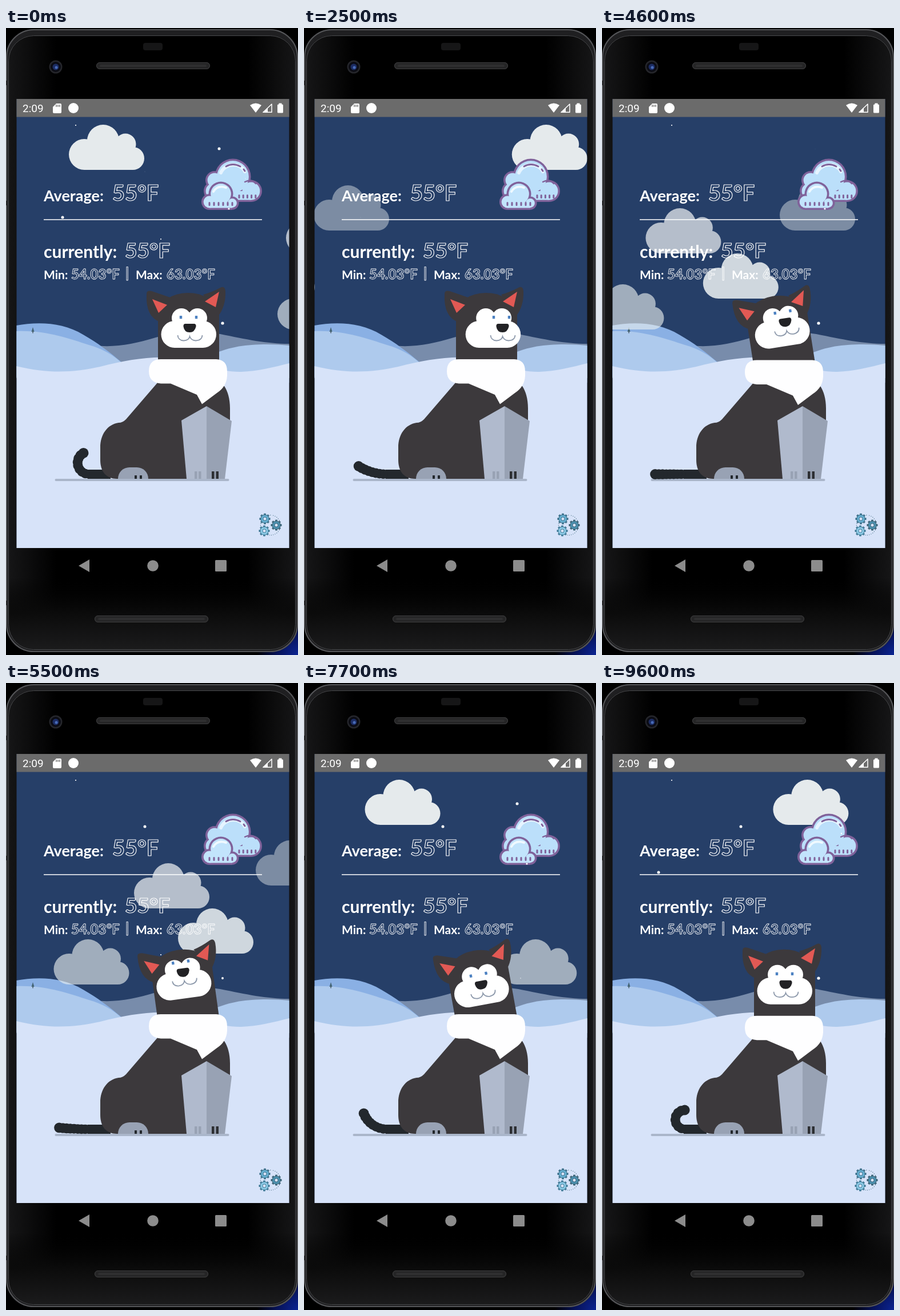
Animation, 511 px wide and 1096 px high, one loop 9.7 s. Source, as an HTML page with a canvas:

```html
<!DOCTYPE html>
<html lang="en">
<head>
<meta charset="utf-8">
<title>Winter weather</title>
<style>
html, body { margin: 0; width: 100%; height: 100%; overflow: hidden; background: #000; }
canvas { display: block; width: 100vw; height: 100vh; }
</style>
</head>
<body>
<canvas id="stage" width="511" height="1096"></canvas>
<script>
const c = document.getElementById('stage').getContext('2d');
const LOOP = 9.7, STEP = 0.1;

const clamp = u => Math.max(0, Math.min(1, u));
const wave = turns => Math.cos(turns * Math.PI * 2);

// Eased 0 to 1 between two times
function ramp(from, to, t) {
  const u = clamp((t - from) / (to - from));
  return u * u * (3 - 2 * u);
}

// Rises over one span of time and falls over another
const swell = (a, b, d, e, t) => ramp(a, b, t) * (1 - ramp(d, e, t));

function shape(d, color) {
  c.fillStyle = color;
  c.fill(new Path2D(d));
}

function line(d, color, width) {
  c.strokeStyle = color;
  c.lineWidth = width;
  c.stroke(new Path2D(d));
}

function box(x, y, w, h, r, color) {
  c.fillStyle = color;
  c.beginPath();
  c.roundRect(x, y, w, h, r);
  c.fill();
}

function frameBox(x, y, w, h, r, color, width) {
  c.strokeStyle = color;
  c.lineWidth = width;
  c.beginPath();
  c.roundRect(x, y, w, h, r);
  c.stroke();
}

function dot(x, y, r, color) {
  c.fillStyle = color;
  c.beginPath();
  c.arc(x, y, r, 0, 7);
  c.fill();
}

function shade(gradient, ...colors) {
  colors.forEach((color, i) => gradient.addColorStop(i / (colors.length - 1), color));
  return gradient;
}

// Phone

function phone() {
  box(0, 0, 511, 1096, 0, '#000');
  const glow = c.createRadialGradient(511, 1096, 2, 511, 1096, 72);
  box(430, 1030, 81, 66, 0, shade(glow, '#0b2390', '#061258', '#000'));

  box(0, 2, 511, 1089, 48, '#1f1f21');
  frameBox(1, 3, 509, 1087, 48, '#555659', 2);
  box(4, 13, 503, 1074, 44, shade(c.createLinearGradient(4, 0, 507, 0), '#161617', '#000', '#000', '#000', '#000', '#000', '#161617'));
  box(5, 960, 501, 126, [0, 0, 44, 44], shade(c.createLinearGradient(0, 960, 0, 1086), '#0000', '#0b0b0b', '#1b1b1c'));
  frameBox(4.5, 13.5, 502, 1073, 44, '#48494c', 1);
  for (const y of [92, 302, 1001]) box(0, y, 4, 8, 0, '#2b2b2d');

  box(240, 26, 34, 13, 4, '#161617');
  for (const [x, y] of [[158, 60], [155, 1027]]) {
    box(x, y, 199, 12, 6, '#252526');
    frameBox(x + 0.5, y + 0.5, 198, 11, 5.5, '#3f3f40', 1);
    box(x + 6, y + 4, 187, 4, 2, '#2f2f30');
  }
  dot(87, 68, 11.5, '#25262b');
  dot(87, 68, 9, '#0b0c14');
  dot(87, 68, 5.5, '#1c2c62');
  dot(88, 69, 2.5, '#486bb8');

  shape('M127 940 L146 929 V951 Z', '#8c8c8c');
  dot(257, 940, 9.8, '#8c8c8c');
  box(366, 930, 20, 20, 1.5, '#8c8c8c');
}

function statusBar() {
  box(18, 124, 478, 31.5, 0, '#6b6b6b');
  c.fillStyle = '#fff';
  c.font = '19px Roboto, sans-serif';
  c.fillText('2:09', 29, 147);
  shape('M88 132 H95 Q97 132 97 134 V147 Q97 149 95 149 H84 Q82 149 82 147 V138 Z', '#fff');
  for (const x of [88, 91, 94]) box(x - 0.7, 134, 1.4, 4, 0, '#6b6b6b');
  dot(118, 140, 9, '#fff');
  shape('M427 135 Q437 128 447 135 L437 148 Z', '#fff');
  line('M450 147.2 L465 133 V147.2 Z', '#fff', 1.5);
  shape('M449 148 L458 139.5 V148 Z', '#fff');
  box(475, 133.5, 10, 15, 1.5, '#fff');
  box(477.5, 131.5, 5, 3, 0, '#fff');
}

// Landscape

function hills() {
  shape('M130 550 C175 562 215 555 262 541 C292 532 340 529 375 535 C420 544 455 552 496 552 V620 H130 Z', '#788cab');
  shape('M18 520 C55 513 100 514 135 536 C160 550 182 567 202 584 V610 H18 Z', '#8ab0e4');
  shape('M18 530 C70 528 110 543 145 554 C170 561 188 572 202 585 V612 H18 Z', '#aecaed');
  shape('M335 585 C370 563 400 556 430 554 C455 552 475 553 496 555 V612 H335 Z', '#aecaed');
  shape('M18 591 C75 605 120 602 165 592 C215 579 265 571 312 579 C350 586 372 602 412 601 C440 600 468 593 496 586 V909 H18 Z', '#d7e3f9');
  shape('M47 523 L49.5 531 H44.5 Z', '#456575');
  box(46.3, 531, 1.4, 2.5, 0, '#46525c');
}

// Each cloud drifts at its own speed and comes round again after its span
const CLOUDS = [
  { base: 248, alpha: 0.97, x: 110, speed: 101.5, span: 785 },
  { base: 354, alpha: 0.43, x: -333, speed: 140, span: 1250 },
  { base: 394, alpha: 0.72, x: 490, speed: 164, span: 1168 },
  { base: 473, alpha: 0.86, x: -458, speed: 138, span: 1100 },
  { base: 527, alpha: 0.62, x: 475, speed: 119, span: 1046 }
];

function cloud({ base, alpha, x, speed, span }, t) {
  const margin = 150;
  const along = (x + speed * t + margin + span) % span - margin;
  c.save();
  c.translate(along, base);
  c.globalAlpha = alpha;
  c.fillStyle = '#ecf0f1';
  c.beginPath();
  for (const [cx, cy, r] of [[27, -27, 27], [60, -51, 28], [99, -45, 18.5], [112, -20, 20]]) {
    c.moveTo(cx + r, cy);
    c.arc(cx, cy, r, 0, Math.PI * 2);
  }
  c.rect(27, -48, 85, 48);
  c.fill();
  c.restore();
}

// Swells and vanishes once per period; peak is the brightest part of it
function star(x, y, size, period, peak, t) {
  const r = size * clamp(0.5 + 2 * wave(t / period - peak));
  if (r > 0.05) dot(x, y, r, '#fff');
}

function stars(t) {
  star(122, 170, 1.1, 4.7, 0.02, t);
  star(373, 211, 2.5, 3.5, 0.03, t);
  star(243, 251, 2.5, 2, 0.72, t);
  star(99, 331, 2.5, 3.3, 0.04, t);
  star(271, 369, 1.1, 3.5, 0.03, t);
  star(271, 475, 1.1, 1.66, 0.13, t);
  star(379, 516, 2.6, 4.4, 0.02, t);
}

// Readout

function label(text, x, y, size) {
  c.font = `bold ${size}px Lato, sans-serif`;
  c.fillStyle = '#fff';
  c.fillText(text, x, y);
}

function outlined(text, x, y, size) {
  c.font = `bold ${size}px Lato, sans-serif`;
  c.strokeStyle = '#fff';
  c.lineWidth = size > 30 ? 1.2 : 0.9;
  c.lineJoin = 'round';
  c.strokeText(text, x, y);
}

function readout() {
  label('Average:', 66, 303, 27);
  outlined('55°F', 186, 302, 38);
  box(66, 334.2, 382, 1.6, 0, '#fff');
  label('currently:', 66, 402, 30);
  outlined('55°F', 208, 402, 37);
  label('Min:', 66, 439, 21);
  outlined('54.03°F', 114, 439, 24);
  outlined('|', 209, 437, 24);
  label('Max:', 227, 439, 21);
  outlined('63.03°F', 281, 439, 24);
}

// Joined circles on a flat base, with a rim
function puff(circles, base, rim, fill) {
  const first = circles[0], last = circles[circles.length - 1];
  for (const [inset, color] of [[0, rim], [3.6, fill]]) {
    for (const [x, y, r] of circles) dot(x, y, r - inset, color);
    box(first[0], first[1], last[0] - first[0], base - inset - first[1], 0, color);
  }
}

function dashes(from, to, gap, y, color) {
  for (let x = from; x <= to; x += gap) box(x - 1.5, y, 3, 7, 1.5, color);
}

function weatherIcon() {
  const rim = '#80629a';
  c.lineCap = 'round';
  puff([[363, 285, 17], [365, 266, 16], [397, 260, 31.5], [429, 285, 19]], 304, rim, '#bbdffa');
  line('M376 253 C383 236 410 234 418 251', '#e6f4ff', 6);
  line('M385 242 Q397 235 410 242', rim, 3);
  line('M416 247 L418 250', rim, 3);
  line('M418 269 Q430 263 437 272', rim, 2.5);
  dashes(408, 437, 7.2, 291, rim);
  puff([[356, 304, 14], [376, 290, 21.5], [396, 306, 11.5]], 318, rim, '#c2e4fc');
  line('M363 286 Q370 274 385 279', '#eff9ff', 4);
  dashes(356, 397, 8, 304, rim);
}

function gear(x, y, rim, fill) {
  c.save();
  c.translate(x, y);
  for (let i = 0; i < 8; i++) {
    c.rotate(Math.PI / 4);
    box(-2, -9.6, 4, 4, 1, rim);
  }
  dot(0, 0, 7.6, rim);
  dot(0, 0, 6.6, fill);
  dot(0, 0, 3.5, rim);
  dot(0, 0, 2.5, '#d7e3f9');
  c.restore();
}

function gears() {
  for (let a = -1.3; a < 4.8; a += 0.2) {
    dot(463 + 17.5 * Math.cos(a), 869 + 17.5 * Math.sin(a), 0.7, '#54788e');
  }
  gear(453, 858, '#41748e', '#66b0d2');
  gear(473, 869, '#41687b', '#4b91b0');
  gear(452, 879, '#467f9b', '#8bcae6');
}

// Dog

const FUR = '#3c393c', PALE = '#b0bacd', GREY = '#98a2b4', INK = '#23282d';

// The tail uncurls until it lies flat, then curls up again
function tail(t) {
  const curl = 0.125 * (t - 4.6) ** 2, links = 8, reach = 52 / links;
  box(143, 772, 40, 16, 0, INK);
  let x = 145, y = 780;
  for (let i = 0; i < links; i++) {
    const a = curl * (i + 0.5) / links;
    const nx = x - reach * Math.cos(a), ny = y - reach * Math.sin(a);
    line(`M${x} ${y} L${nx} ${ny}`, INK, 15);
    x = nx;
    y = ny;
    dot(x, y, 8.2 + 0.8 * i / links, INK);
  }
}

function body() {
  shape('M266 619 L210 684 Q204 690 197 690 C177 693 165 711 165 733 V755 C165 776 176 788 194 788 H325 L388 720 Q392 715 392 690 V665 C392 648 388 635 382 626 Z', FUR);
  box(196, 768, 53, 20, [20, 20, 0, 0], GREY);
  for (const x of [225, 234]) box(x, 782, 4, 6, 0, INK);
}

function frontLegs() {
  shape('M351 661 L307 686 L316 788 H351 Z', PALE);
  shape('M351 661 L395 687 L383 788 H351 Z', GREY);
  for (const x of [330, 337]) box(x, 775, 4.5, 13, 0, GREY);
  for (const x of [360, 367.5]) box(x, 775, 4.5, 13, 0, '#2d2f33');
}

function face(t) {
  const lookX = 26 * swell(1.2, 2.5, 3.5, 5.5, t);
  const lookY = -21 * swell(3.4, 5.5, 5.5, 7.2, t);
  const blink = t > 8.35 && t < 8.65;

  c.save();
  c.translate(lookX * 0.43, lookY * 0.5);
  dot(307, 507, 17, '#fff');
  dot(335, 507, 17, '#fff');
  box(271.5, 512, 96.5, 47, 23.5, '#fff');
  c.restore();

  c.save();
  c.translate(lookX, lookY);
  for (const x of [306, 333]) {
    if (blink) box(x - 4, 507, 8, 1.5, 0.7, '#5a7694');
    else box(x - 2.2, 503, 4.4, 5.2, 0.5, '#4d82c2');
  }
  shape('M314 517 H329 Q333 517 332.5 522 Q330 532 321.5 532 Q312 532 310.5 522 Q310 517 314 517 Z', '#222225');
  line('M300.5 537 Q301 546 311 546.5 Q320 546 321.5 539 Q324 546 332 546.5 Q343 546 343.5 537', '#8d99ab', 1.8);
  c.restore();
}

function head(t) {
  const tilt = swell(2.5, 3.5, 8.5, 9.6, t) * (10 + 2.5 * wave((t - 3.5) / 3.4));
  c.save();
  c.translate(328 - 0.2 * tilt, 575 + 0.15 * tilt);
  c.rotate(-tilt * Math.PI / 180);
  c.translate(-328, -575);
  shape('M266 604 V500 Q275 464 318 463 Q360 463 373 500 V604 Z', FUR);
  shape('M246 465 Q246 458 255 460 Q270 465 290 472 L270 514 Q244 505 246 465 Z', FUR);
  shape('M345 466 Q360 462 375 454 Q383 450 384 460 Q385 486 371 504 Z', FUR);
  shape('M256 474 L282 484 L267 498 Z', '#e25954');
  shape('M373 461 L348 478 L367 488 Z', '#e25954');
  face(t);
  c.restore();
}

function collar() {
  shape('M271 579 H368 Q387 580 387 600 V608 Q386 627 369 638 L343 657.5 L334 641 L288 621.5 H271 Q250 620 250 600 Q250 579 271 579 Z', '#fefeff');
}

function dog(t) {
  const breath = 2.7 * Math.max(0, wave((t - 6.9) / 2.7));
  box(85.5, 788, 305, 4, 2, '#aab6ca');
  tail(t);
  body();
  c.save();
  c.translate(0, breath);
  head(t);
  collar();
  c.restore();
  frontLegs();
}

function draw(t) {
  phone();
  c.save();
  c.beginPath();
  c.rect(18.5, 124, 477, 785);
  c.clip();
  box(18, 124, 478, 785, 0, '#263f68');
  hills();
  for (const item of CLOUDS) cloud(item, t);
  stars(t);
  dog(t);
  readout();
  weatherIcon();
  star(390, 316, 1.6, 4.25, 0.92, t);
  star(419, 263, 1.2, 3.05, 0.25, t);
  gears();
  statusBar();
  c.restore();
}

const start = performance.now();
function tick() {
  const t = (performance.now() - start) / 1000 % LOOP;
  draw(Math.floor(t / STEP) * STEP);
  requestAnimationFrame(tick);
}
tick();
</script>
</body>
</html>
```
